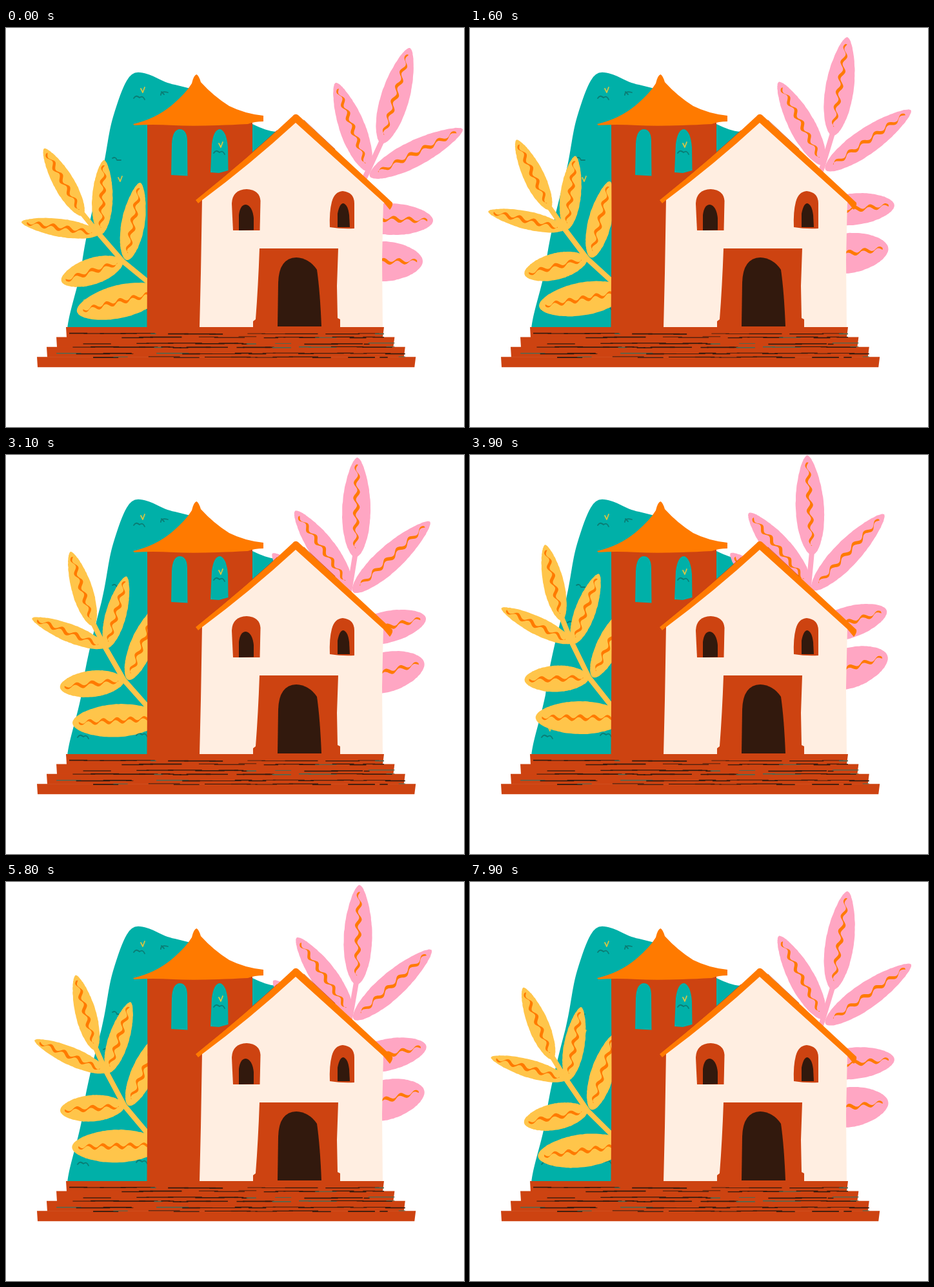
An HTML page with a canvas for the animation above (8 s loop, 710 by 619 pixels).

```html
<!DOCTYPE html>
<html lang="en">
<head>
<meta charset="utf-8">
<title>Chapel with swaying plants</title>
<style>
html, body { margin: 0; width: 100%; height: 100%; overflow: hidden; background: #fff; }
canvas { display: block; width: 710px; height: 619px; }
</style>
</head>
<body>
<canvas id="stage" width="710" height="619"></canvas>
<script>
const ctx = document.getElementById('stage').getContext('2d');
const LOOP = 8000, STEP = 100;
const C = {
  teal: '#00b0a8', tealDark: '#0b7d75', red: '#cd4311', orange: '#ff7a00',
  cream: '#ffeee1', dark: '#32190d', pink: '#ffa6c3', yellow: '#ffc54a'
};

let seed = 11;
function rnd() {
  seed = (seed * 16807) % 2147483647;
  return seed / 2147483647;
}

function fill(d, color) {
  ctx.fillStyle = color;
  ctx.fill(d instanceof Path2D ? d : new Path2D(d));
}

function stroke(d, color, width) {
  ctx.strokeStyle = color;
  ctx.lineWidth = width;
  ctx.lineCap = ctx.lineJoin = 'round';
  ctx.stroke(d instanceof Path2D ? d : new Path2D(d));
}

// Steady swing between two turning points; time in seconds, 0 = rest, 1 = bent
const mix = (a, b, u) => a + (b - a) * u;
function swing(t, low, high) {
  if (t < low.t) return mix(low.v, 0, 1 - t / low.t);
  if (t < high.t) return mix(low.v, high.v, (t - low.t) / (high.t - low.t));
  return mix(high.v, low.v, (t - high.t) / 6.2);
}
const yellowSway = t => swing(t, { t: 0.52, v: -0.1 }, { t: 4.38, v: 1.12 });
const pinkSway = t => swing(t, { t: 0, v: 0 }, { t: 4.1, v: 1.06 });

// Leaves at rest: tip, base, width
const yellowPlant = {
  color: C.yellow, sway: yellowSway, pivot: [243, 350], turn: 18,
  stem: [[116, 285], [142, 317], [181, 362], [230, 402]],
  leaves: [
    [59, 187, 119, 291, 32], [152, 205, 147, 320, 32], [208, 240, 187, 360, 36],
    [24, 301, 144, 319, 28], [86, 393, 181, 362, 41], [110, 440, 245, 408, 51]
  ]
};
const pinkPlant = {
  color: C.pink, sway: pinkSway, pivot: [486, 317], turn: -19.3,
  stem: [[586, 168], [562, 220], [538, 270]],
  leaves: [
    [626, 31, 582, 179, 44], [511, 85, 562, 222, 40], [708, 157, 564, 230, 40],
    [662, 299, 535, 294, 49], [646, 362, 520, 362, 62]
  ]
};
const backLeaf = {
  color: C.pink, sway: pinkSway, pivot: [404, 285], turn: -19.3,
  stem: [], leaves: [[448, 160, 509, 274, 36]]
};

// Parts rooted lower down turn less, about a lower point
function hinge(plant, y, p) {
  const sag = Math.max(0, y - 330);
  const turn = plant.turn - Math.sign(plant.turn) * 0.05 * sag;
  return { x: plant.pivot[0], y: plant.pivot[1] + sag / 2, a: turn * p * Math.PI / 180 };
}

function outline(n, edge) {
  const p = new Path2D();
  for (let i = 0; i <= n; i++) p.lineTo(...edge(i / n, 1));
  for (let i = n; i >= 0; i--) p.lineTo(...edge(i / n, -1));
  p.closePath();
  return p;
}

function makeLeaf([x, y, bx, by, width]) {
  const length = Math.hypot(bx - x, by - y);
  const bulge = width < 0.3 * length ? 1.15 : 1;
  const blade = outline(60, (s, side) => {
    const u = (1 - Math.cos(Math.PI * s)) / 2;
    const arc = Math.max(0, Math.sin(Math.PI * u ** bulge));
    return [u * length, side * (width / 2 * arc ** 0.5 + (rnd() - 0.5) * 0.5)];
  });
  const span = length * 0.84, turns = Math.round(span / 25) + 0.5;
  const vein = outline(80, (u, side) => {
    const half = 0.4 + 1.8 * Math.sin(Math.PI * u) ** 0.5;
    const wave = 3 * Math.sin(turns * 2 * Math.PI * u + side * 0.35);
    return [length * 0.07 + u * span, wave + side * half];
  });
  return { x, y, by, angle: Math.atan2(by - y, bx - x), blade, vein };
}

function drawLeaf(plant, leaf, p) {
  const h = hinge(plant, leaf.by, p);
  ctx.save();
  ctx.translate(h.x, h.y);
  ctx.rotate(h.a);
  ctx.translate(leaf.x - h.x, leaf.y - h.y);
  ctx.rotate(leaf.angle);
  fill(leaf.blade, plant.color);
  fill(leaf.vein, C.orange);
  ctx.restore();
}

function drawPlant(plant, t) {
  const p = plant.sway(t), stem = new Path2D();
  plant.stem.forEach(([x, y]) => {
    const h = hinge(plant, y, p), c = Math.cos(h.a), s = Math.sin(h.a);
    stem.lineTo(h.x + (x - h.x) * c - (y - h.y) * s, h.y + (x - h.x) * s + (y - h.y) * c);
  });
  stroke(stem, plant.color, 8);
  plant.shapes.forEach(leaf => drawLeaf(plant, leaf, p));
}

// Grass marks on the hill
function tuft(x, y) {
  stroke(`M${x - 9} ${y + 3}q4 -6 9 -1q5 -4 8 3M${x} ${y + 2}l-4 -2`, C.tealDark, 1.8);
}
function sprout(x, y) {
  stroke(`M${x - 3} ${y - 3}l3 6l3 -8`, '#d5c546', 1.8);
}

function drawHill() {
  fill('M95 467C98 440 108 415 117 372C122 330 133 285 148 228C157 190 158 165 166 138' +
    'C174 112 180 94 187 82Q195 67 208 69C228 71 240 84 262 88L290 95L382 149' +
    'C397 156 406 160 420 161L470 300L330 467Z', C.teal);
  stroke('M240 104q0 -7 11 -4M241 99l4 4M165 202q5 -3 7 3l6 0M151 260q5 -4 9 1M146 358q4 -2 7 2',
    C.tealDark, 1.8);
  tuft(207, 106);
  tuft(120, 435);
  tuft(211, 432);
  sprout(212, 97);
  sprout(177, 235);
  sprout(124, 425);
}

function drawTower() {
  fill('M219 149L382 147V300L310 467H218.500L219.500 300Z', C.red);
  fill('M256 228L257 180Q258 157 270 157Q281 158 281 176L281.500 229.500Z', C.teal);
  fill('M317 224L319 180Q322 157 332 157Q342 160 344 185L344.500 221L330 225Z', C.teal);
  tuft(331, 191);
  sprout(333, 182);
  fill('M197 149Q232 141 258 119Q279 101 288 86Q291 73 295.500 72Q299 74 302 84' +
    'Q322 106 346 121Q370 133 399 136V145Q385 145 375 149Q300 153 260 151Q225 149 199 151Z', C.orange);
}

function drawHouse() {
  fill('M449 140L585 268L583 360L584 466H300L302 380L304 264Z', C.cream);
  fill('M294 267Q375 202 444 137Q449 130 456 138L599 271Q600 276 595 282' +
    'L585 270L449 147Q378 212 304 267L298 272Z', C.orange);
  stroke('M300 261Q370 205 420 159M462 143L510 188', C.red, 0.8);
  fill('M352 314Q351 295 350 272Q351 251 373 250Q393 251 394.500 268L393.500 314Z', C.red);
  fill('M361 314V290Q363 274 372 274Q382 276 384 295V313.500Z', C.dark);
  fill('M502 309Q501 285 505 270Q509 254 522 253Q540 255 540 272V311Q520 312 502 309Z', C.red);
  fill('M514 309V288Q517 272 523 272Q530 274 532 290L533 309Z', C.dark);
  fill('M393 342H515L513 400L514 450L518 452V467H383V455L387 452Q391 400 393 342Z', C.red);
  fill('M421 463L422 395Q423 357 450 356Q470 357 482 375Q487 410 489 463Z', C.dark);
}

// Four treads, each wider than the one above, with broken brush lines between them
const treads = [], dashes = [];
for (let i = 0; i < 4; i++) {
  const y = 464 + 15.4 * i, left = 93 - 15 * i, right = 586 + 16.4 * i;
  treads.push(`M${left} ${y}H${right}L${right - 2} ${y + 16}H${left + 1}Z`);
  if (i === 3) break;
  for (const row of [9.5, 15.2]) {
    for (let x = left + 5 + rnd() * 40; x < right - 10;) {
      const len = 8 + rnd() * 45;
      if (rnd() < 0.75) {
        dashes.push({
          x, y: y + row + (rnd() - 0.5) * 1.6, len: Math.min(len, right - x),
          h: 0.8 + rnd(), color: rnd() < 0.12 ? '#4a6a55' : C.dark
        });
      }
      x += len * 0.8;
    }
  }
}

function drawStairs() {
  treads.forEach(d => fill(d, C.red));
  dashes.forEach(d => {
    ctx.fillStyle = d.color;
    ctx.fillRect(d.x, d.y, d.len, d.h);
  });
}

function render(ms) {
  const t = Math.floor((ms % LOOP) / STEP) * STEP / 1000;
  ctx.fillStyle = '#fff';
  ctx.fillRect(0, 0, 710, 619);
  drawHill();
  plants.forEach(plant => drawPlant(plant, t));
  drawTower();
  drawHouse();
  drawStairs();
}

const plants = [backLeaf, pinkPlant, yellowPlant];
plants.forEach(plant => { plant.shapes = plant.leaves.map(makeLeaf); });
const start = performance.now();
function loop() {
  render(performance.now() - start);
  requestAnimationFrame(loop);
}
loop();
</script>
</body>
</html>
```
